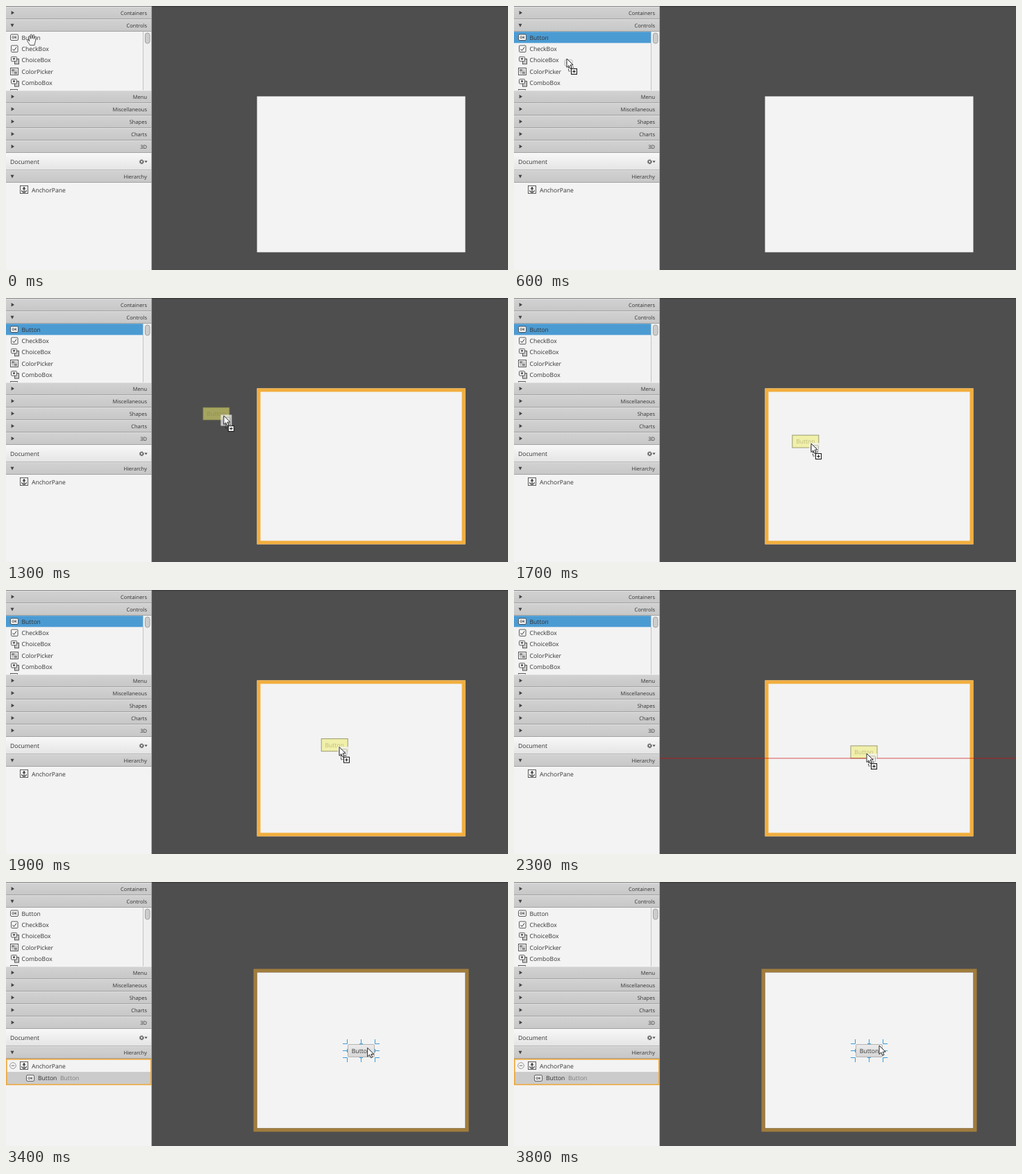
These frames come from a looping animation (723 px wide and 381 px high, 3.9 s). An HTML page:

```html
<!DOCTYPE html>
<html lang="en">
<head>
<meta charset="utf-8">
<title>Drag a button onto the pane</title>
<style>
html, body { margin: 0; width: 100%; height: 100%; overflow: hidden; background: #4e4e4e; }
svg { display: block; }
text { font: 8.6px "Open Sans", "Noto Sans", sans-serif; fill: #333; text-rendering: geometricPrecision; }
.title { font-size: 7.5px; text-anchor: end; }
.icon { fill: #fafafa; stroke: #484848; stroke-width: .9; }
.guide { fill: #d01010; opacity: .7; }
</style>
</head>
<body>
<svg width="723" height="381" viewBox="0 0 723 381">
  <defs>
    <linearGradient id="bar" x2="0" y2="1">
      <stop stop-color="#d2d2d2"/><stop offset="1" stop-color="#c7c7c7"/>
    </linearGradient>
    <linearGradient id="doc" x2="0" y2="1">
      <stop stop-color="#f8f8f8"/><stop offset="1" stop-color="#e4e4e4"/>
    </linearGradient>
    <linearGradient id="face" x2="0" y2="1">
      <stop stop-color="#ececec"/><stop offset="1" stop-color="#d6d6d6"/>
    </linearGradient>
    <clipPath id="work"><rect x="210" width="513" height="381"/></clipPath>
    <clipPath id="list"><rect y="37" width="210" height="84.5"/></clipPath>
    <g id="ok">
      <rect class="icon" x=".5" y=".5" width="11" height="8.5" rx="1.5"/>
      <text x="6" y="6.7" text-anchor="middle" style="font-size:5px;font-weight:700">OK</text>
    </g>
    <g id="popup">
      <rect class="icon" x="5" y="3" width="6" height="7.5" style="fill:#ccc"/>
      <rect class="icon" width="8" height="6.5" rx="1"/>
      <path d="M1.8 2h4.4l-2.2 2.8z" fill="#333"/>
    </g>
  </defs>

  <rect x="210" width="513" height="381" fill="#4e4e4e"/>
  <rect x="210" width="513" height="1.2" fill="#383838"/>
  <rect x="361.5" y="130.4" width="300" height="225" fill="#f3f3f3"/>
  <rect id="hover" x="364" y="132.9" width="295" height="220" fill="none" stroke="#f2ae3e" stroke-width="5"/>
  <g id="ghost" clip-path="url(#work)">
    <g id="ghostBox">
      <rect width="38" height="18" fill="#f1ee70" fill-opacity=".54" stroke="#77754a" stroke-opacity=".7"/>
      <text x="19" y="12.2" text-anchor="middle" style="fill:#77733c;opacity:.42">Button</text>
    </g>
  </g>
  <rect id="guideY" class="guide" x="210" width="513" height="1"/>
  <rect id="guideX" class="guide" width="1" height="381"/>

  <g id="placed">
    <rect x="359" y="127.9" width="305" height="230" fill="none" stroke="#a17c3c" stroke-width="5"/>
    <rect x="492.5" y="234.5" width="38" height="18" rx="1.5" fill="url(#face)" stroke="#b4b4b4"/>
    <text x="511.5" y="246.6" text-anchor="middle">Button</text>
    <path id="handles" fill="none" stroke="#3f9bd6"/>
  </g>

  <rect width="210" height="381" fill="#f3f3f3"/>
  <g clip-path="url(#list)">
    <rect id="selected" y="37.2" width="197" height="16.2" fill="#4b9bd3"/>
    <use href="#ok" x="6" y="40.5"/>
    <rect class="icon" x="7.5" y="57" width="9.5" height="9.5" rx="1"/>
    <path d="M9.5 62l2 2.4 3.5-5" fill="none" stroke="#333"/>
    <use href="#popup" x="7.5" y="73.3"/>
    <rect class="icon" x="6.5" y="89.5" width="11" height="10"/>
    <path d="M8 91h4v3.6H8zM12 94.6h4v3.6h-4z" fill="#8a8a8a"/>
    <path d="M12 91h4v3.6h-4zM8 94.6h4v3.6H8z" fill="#c8c8c8"/>
    <use href="#popup" x="7.5" y="105.6"/>
    <rect class="icon" x="6.5" y="120.5" width="10" height="9"/>
    <g id="items"></g>
    <path d="M197.5 37v85" stroke="#c4c4c4"/>
    <rect x="198" y="37" width="12" height="85" fill="#efefef"/>
    <rect x="200.5" y="39" width="6.5" height="15" rx="3" fill="#cdcdcd" stroke="#a2a2a2"/>
  </g>

  <g id="bars"></g>
  <rect y="212" width="210" height="25" fill="url(#doc)"/>
  <path d="M0 236.6h210" stroke="#b4b4b4"/>
  <text x="6" y="228.2">Document</text>
  <circle cx="195.4" cy="224.8" r="2" fill="none" stroke="#555" stroke-width="1.2"/>
  <circle cx="195.4" cy="224.8" r="3.1" fill="none" stroke="#555" stroke-dasharray="1.2 1.235"/>
  <path d="M199.6 223.6h4l-2 2.6z" fill="#444"/>

  <g id="branch">
    <rect y="274" width="209" height="18.5" fill="#cbcbcb"/>
    <rect x=".8" y="255.8" width="208" height="36.6" fill="none" stroke="#eda83c" stroke-width="1.6"/>
    <circle cx="10" cy="265" r="4.3" fill="#f6f6f6" stroke="#8c8c8c" stroke-width=".9"/>
    <path d="M7.8 265h4.4" stroke="#666"/>
    <use href="#ok" x="29" y="278.3"/>
    <text x="46" y="286.4">Button</text>
    <text x="78" y="286.4" style="fill:#808080">Button</text>
  </g>
  <rect class="icon" x="20.5" y="259.5" width="11" height="11"/>
  <path d="M26 262v7M23.8 263.8h4.4M22.6 266q.6 3 3.4 3t3.4-3" fill="none" stroke="#222" stroke-width="1.1"/>
  <circle cx="26" cy="262" r="1" fill="#222"/>
  <text x="37" y="268.6">AnchorPane</text>
  <path d="M209.6 0v381" stroke="#a4a4a4" stroke-width=".8"/>
  <path d="M0 .5h210" stroke="#858585"/>

  <path id="hand" d="M4.4 16.5C3 13.4 .6 11.5 .6 9.8 1.4 8.4 2.8 9.2 3.8 10.8L2.5 4.8C2.4 3.2 4 2.8 4.5 4.2L5.6 7.4 5.2 2.2C5.4.6 7 .6 7.3 2.2L7.8 7 8.7 2.2C9.2.8 10.7 1.1 10.6 2.6L10.2 7.5 11.8 4.4C12.6 3.4 13.8 4 13.5 5.4L12.2 11.4 11 16.5Z"
    fill="#f6f6f6" stroke="#444" stroke-width=".9" stroke-linejoin="round"/>
  <g id="drag">
    <g id="chip">
      <rect x="-8" y="-8" width="16" height="16" fill="#f4f4f4" opacity=".72"/>
      <use href="#ok" x="-6" y="-4.7" opacity=".42"/>
    </g>
    <rect x="2.5" y="12" width="7" height="6" fill="none" stroke="#222" stroke-width=".9" stroke-dasharray="2 1"/>
    <rect x="6.5" y="14.5" width="8" height="8" fill="#fff" stroke="#111"/>
    <path d="M10.5 16.3v4.4M8.3 18.5h4.4" stroke="#111"/>
  </g>
  <path id="pointer" d="M0 0V12.6L2.9 9.9 4.9 14.4 7 13.5 5.1 9.1H9.1Z"
    fill="#fff" stroke="#111" stroke-width=".9" stroke-linejoin="round"/>
</svg>
<script>
const LOOP = 3900, TICK = 100;
const SELECT = 200, LIFT = 300, ENTER = 1000, SETTLE = 2300, DROP = 3300;
const PAGE = { x: 361.5, y: 130.4, w: 300, h: 225 };
const BOX = { w: 38, h: 18 };
const MARGIN = 10, REACH = 5.5;

// time, x, y of the pointer; straight between
const path = [
  [0, 37, 48], [300, 42, 50], [600, 76, 76], [1000, 228, 140], [1700, 428, 210],
  [2000, 506, 235], [2300, 508, 236], [2800, 515, 241], [3300, 518, 241], [3600, 526, 236]
];

const el = id => document.getElementById(id);
const show = (id, on) => el(id).style.display = on ? "" : "none";
const move = (id, x, y) => el(id).setAttribute("transform", `translate(${x} ${y})`);
const mix = (a, b, k) => a + (b - a) * k;
const progress = (t, from, to) => Math.min(1, Math.max(0, (t - from) / (to - from)));

const bar = (name, y, open) => `
  <rect y="${y}" width="210" height="18" fill="url(#bar)"/>
  <path d="M0 ${y + .5}h210" stroke="#dedede"/>
  <path d="M0 ${y + 17.5}h210" stroke="#a3a3a3"/>
  <path d="${open ? `M6.5 ${y + 6.8}h5l-2.5 4.6z` : `M7.6 ${y + 6}l4.4 2.7-4.4 2.7z`}" fill="#444"/>
  <text class="title" x="203" y="${y + 11.8}">${name}</text>`;

function build() {
  el("items").innerHTML = ["Button", "CheckBox", "ChoiceBox", "ColorPicker", "ComboBox"]
    .map((name, i) => `<text x="22.5" y="${48.7 + i * 16.3}">${name}</text>`).join("");
  el("bars").innerHTML = bar("Containers", 1) + bar("Controls", 19, true) +
    ["Menu", "Miscellaneous", "Shapes", "Charts", "3D"].map((name, i) => bar(name, 122 + i * 18)).join("") +
    bar("Hierarchy", 237, true);

  let d = "";
  for (const sx of [-1, 0, 1]) for (const sy of [-1, 0, 1]) {
    if (!sx && !sy) continue;
    const at = `M${511.5 + sx * 20} ${243.5 + sy * 10}`;
    d += `${at}h${sx * 6.5}${at}v${sy * 6.5}`;
    if (!sx) d += `${at}m-2.5 0h5`;
    if (!sy) d += `${at}m0-2.5v5`;
  }
  el("handles").setAttribute("d", d);
}

function pointerAt(t) {
  const i = Math.max(1, path.findIndex(p => p[0] >= t));
  const a = path[t > path.at(-1)[0] ? path.length - 1 : i - 1];
  const b = t > path.at(-1)[0] ? a : path[i];
  const k = a === b ? 0 : progress(t, a[0], b[0]);
  return [mix(a[1], b[1], k), mix(a[2], b[2], k)];
}

// Pull the middle, start or end of a span onto a nearby guide of the page
function snap(pos, size, start, length) {
  const lines = [start + MARGIN, start + length / 2, start + length - MARGIN];
  for (const part of [size / 2, 0, size]) {
    const line = lines.find(g => Math.abs(pos + part - g) < REACH);
    if (line) return [line - part, line];
  }
  return [pos, 0];
}

function draw() {
  const t = Math.floor(performance.now() % LOOP / TICK) * TICK;
  const [x, y] = pointerAt(t);
  const drift = progress(t, ENTER, SETTLE);
  const [boxX, lineX] = snap(x - mix(32, 23, drift), BOX.w, PAGE.x, PAGE.w);
  const [boxY, lineY] = snap(y - 12, BOX.h, PAGE.y, PAGE.h);
  const over = t >= ENTER && t < DROP;

  show("selected", t >= SELECT && t < DROP);
  show("hand", t < LIFT);
  show("pointer", t >= LIFT);
  show("drag", t >= LIFT && t < DROP);
  show("hover", over);
  show("ghost", over);
  show("guideX", over && lineX);
  show("guideY", over && lineY);
  show("placed", t >= DROP);
  show("branch", t >= DROP);

  move("hand", x - 7, y - 8);
  move("pointer", x, y);
  move("drag", x, y);
  move("chip", mix(2.5, 7, drift), mix(6, 8, drift));
  move("ghostBox", boxX, boxY);
  el("guideX").setAttribute("x", lineX - .5);
  el("guideY").setAttribute("y", lineY - .5);
  requestAnimationFrame(draw);
}

build();
draw();
</script>
</body>
</html>
```
